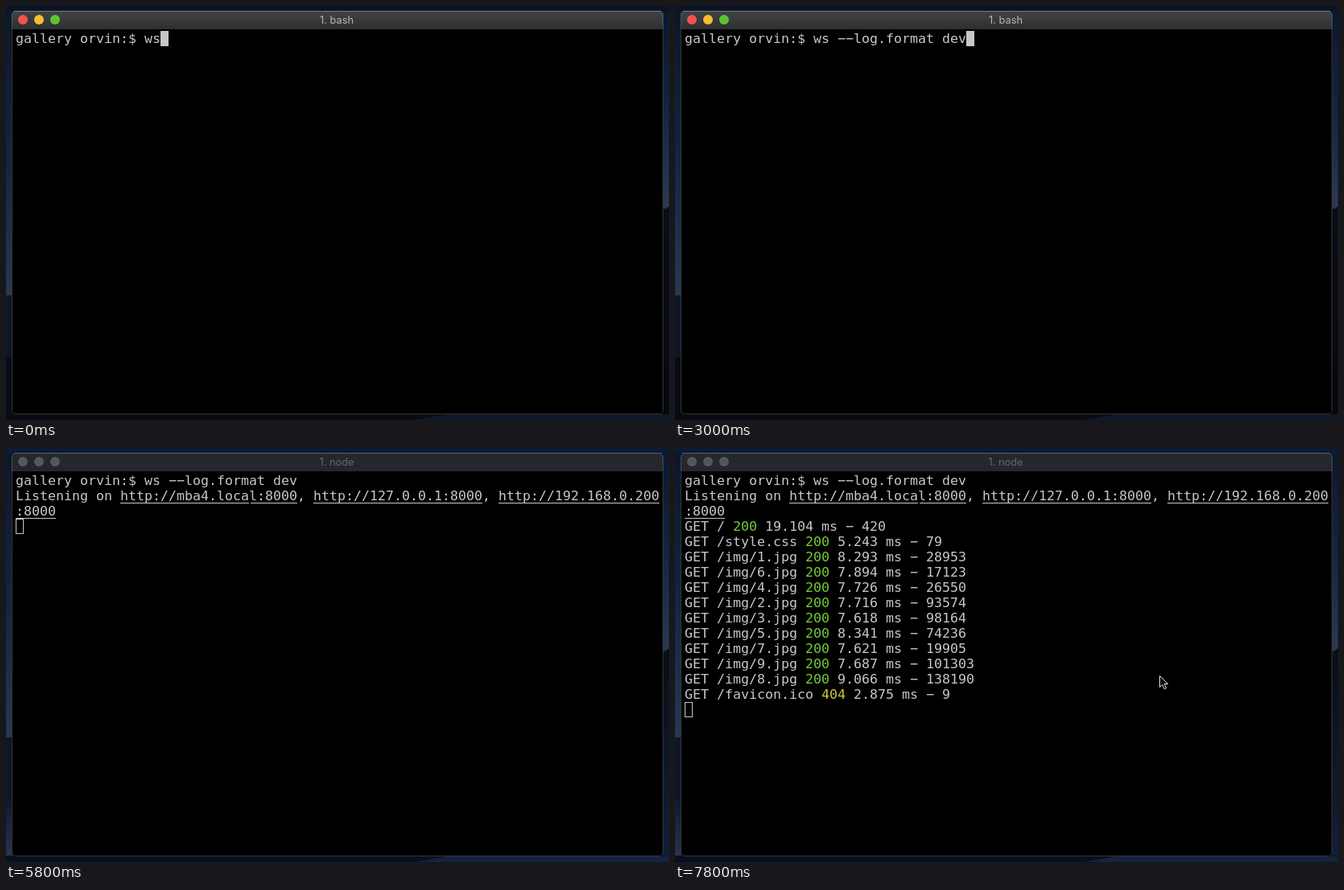
Animation of 824x515 px, one loop 8 s. Source, as an HTML page with a canvas:

```html
<!DOCTYPE html>
<html lang="en">
<head>
<meta charset="utf-8">
<title>Terminal</title>
<style>
  html, body { margin: 0; width: 100%; height: 100%; overflow: hidden; background: #0a1424; }
  canvas { display: block; }
</style>
</head>
<body>
<canvas id="stage" width="824" height="515"></canvas>
<script>
const ctx = document.getElementById('stage').getContext('2d');
const LOOP = 8000;
const CELL = { x: 12, y: 31, width: 10, height: 19 };
const TEXT = '#c7c7c7';
const STATUS = { 200: '#70cf35', 404: '#cfc936' };

const PROMPT = 'gallery orvin:$ ';
const COMMAND = 'ws --log.format dev';
// [time, typed characters]
const TYPING = [[0, 2], [200, 3], [400, 4], [600, 5], [800, 6], [1000, 8],
  [1400, 9], [1600, 11], [1800, 13], [2000, 16], [2200, 19]];
const AT = { enter: 3400, title: 3600, listen: 4000, blur: 5800, log: 6200, favicon: 6400, pointer: 7800 };

const LISTENING = [
  'Listening on http://mba4.local:8000, http://127.0.0.1:8000, http://192.168.0.200',
  ':8000'
];
const REQUESTS = [
  'GET / 200 19.104 ms - 420',
  'GET /style.css 200 5.243 ms - 79',
  'GET /img/1.jpg 200 8.293 ms - 28953',
  'GET /img/6.jpg 200 7.894 ms - 17123',
  'GET /img/4.jpg 200 7.726 ms - 26550',
  'GET /img/2.jpg 200 7.716 ms - 93574',
  'GET /img/3.jpg 200 7.618 ms - 98164',
  'GET /img/5.jpg 200 8.341 ms - 74236',
  'GET /img/7.jpg 200 7.621 ms - 19905',
  'GET /img/9.jpg 200 7.687 ms - 101303',
  'GET /img/8.jpg 200 9.066 ms - 138190'
];
const FAVICON = 'GET /favicon.ico 404 2.875 ms - 9';

function rect(x, y, w, h, fill) {
  ctx.fillStyle = fill;
  ctx.fillRect(x, y, w, h);
}

function polygon(points, fill, stroke) {
  ctx.beginPath();
  points.forEach(([x, y]) => ctx.lineTo(x, y));
  ctx.closePath();
  ctx.fillStyle = fill;
  ctx.fill();
  if (stroke) {
    ctx.strokeStyle = stroke;
    ctx.lineWidth = 1;
    ctx.stroke();
  }
}

function vertical(y0, y1, ...colors) {
  const gradient = ctx.createLinearGradient(0, y0, 0, y1);
  colors.forEach((color, i) => gradient.addColorStop(i / (colors.length - 1), color));
  return gradient;
}

function drawDesktop(focused) {
  rect(0, 0, 824, 515, focused ? '#091527' : '#0d1b33');
  rect(0, 7, 8, 353, vertical(7, 360, '#0a182c', '#13243e', '#293851'));
  rect(0, 360, 8, 77, '#0d1727');
  rect(0, 437, 8, 78, focused ? '#070c16' : vertical(437, 515, '#0d1930', '#2a3850'));
  rect(816, 7, 8, 245, vertical(7, 252, '#0b192f', '#14253f', '#2b3a53'));
  polygon([[816, 256], [824, 249], [824, 515], [816, 515]],
    vertical(250, 515, '#090e17', focused ? '#05080f' : '#10203b'));
  rect(0, 507, 824, 8, focused ? '#070b14' : '#081020');
  polygon([[508, 515], [548, 508], [824, 508], [824, 515]], focused ? '#10192a' : '#14243f');
}

function drawWindow(focused, title) {
  ctx.save();
  ctx.beginPath();
  ctx.roundRect(7, 6, 810, 502, 5);
  ctx.clip();
  rect(7, 6, 810, 502, '#000');
  rect(7, 6, 810, 23, focused ? vertical(6, 29, '#414344', '#2d2f30') : '#25272d');
  rect(7, 6, 810, 1, focused ? '#707274' : '#4b4d52');
  ctx.restore();

  ctx.beginPath();
  ctx.roundRect(7.5, 6.5, 809, 501, 5);
  ctx.strokeStyle = 'rgba(130, 130, 135, .4)';
  ctx.lineWidth = 1;
  ctx.stroke();

  ['#f2544d', '#f6bd2f', '#5ec331'].forEach((color, i) => {
    ctx.beginPath();
    ctx.arc(21 + 20 * i, 17, 6, 0, 2 * Math.PI);
    ctx.fillStyle = focused ? color : '#55575a';
    ctx.fill();
  });

  ctx.font = '12.8px Inter, Roboto, sans-serif';
  ctx.textAlign = 'center';
  ctx.fillStyle = focused ? '#b4b6b7' : '#66686b';
  ctx.fillText(title, 411, 22);
}

function drawLine(line, row) {
  const top = CELL.y + row * CELL.height;
  const toX = column => CELL.x + column * CELL.width;
  let column = 0;
  for (const part of line.split(/(?<= )(200|404)(?= )/)) {
    ctx.fillStyle = STATUS[part] || TEXT;
    // The minus glyph gives the wide dash of the terminal face.
    ctx.fillText(part.replaceAll('-', '\u2212'), toX(column), top + 15);
    column += part.length;
  }
  for (const link of line.matchAll(/(http|^):[^,]*/g)) {
    rect(toX(link.index), top + 18, link[0].length * CELL.width, 1, TEXT);
  }
}

function drawCursor(column, row, focused) {
  const x = CELL.x + column * CELL.width;
  const y = CELL.y + row * CELL.height;
  if (focused) {
    rect(x, y, 10, 19, TEXT);
  } else {
    ctx.strokeStyle = TEXT;
    ctx.lineWidth = 1;
    ctx.strokeRect(x + .5, y + .5, 9, 18);
  }
}

function drawPointer(x, y) {
  polygon([[0, 0], [0, 14], [3.2, 11], [5.6, 16.2], [8, 15.2], [5.7, 10], [10, 10]]
    .map(([dx, dy]) => [x + dx, y + dy]), '#000', '#e6e6e6');
}

function draw(t) {
  const focused = t < AT.blur;
  const typed = TYPING.findLast(([time]) => t >= time)[1];
  const lines = [PROMPT + COMMAND.slice(0, typed)];
  if (t >= AT.listen) lines.push(...LISTENING);
  if (t >= AT.log) lines.push(...REQUESTS);
  if (t >= AT.favicon) lines.push(FAVICON);

  drawDesktop(focused);
  drawWindow(focused, t < AT.title ? '1. bash' : '1. node');

  ctx.font = '16.61px "DejaVu Sans Mono", monospace';
  ctx.textAlign = 'left';
  lines.forEach(drawLine);
  if (t >= AT.listen) rect(302, 68, 2, 1, '#000');

  if (t < AT.enter) drawCursor(lines[0].length, 0, focused);
  else drawCursor(0, lines.length, focused);
  if (t >= AT.pointer) drawPointer(602.5, 283.5);
}

function frame() {
  draw(performance.now() % LOOP);
  requestAnimationFrame(frame);
}
frame();
</script>
</body>
</html>
```
